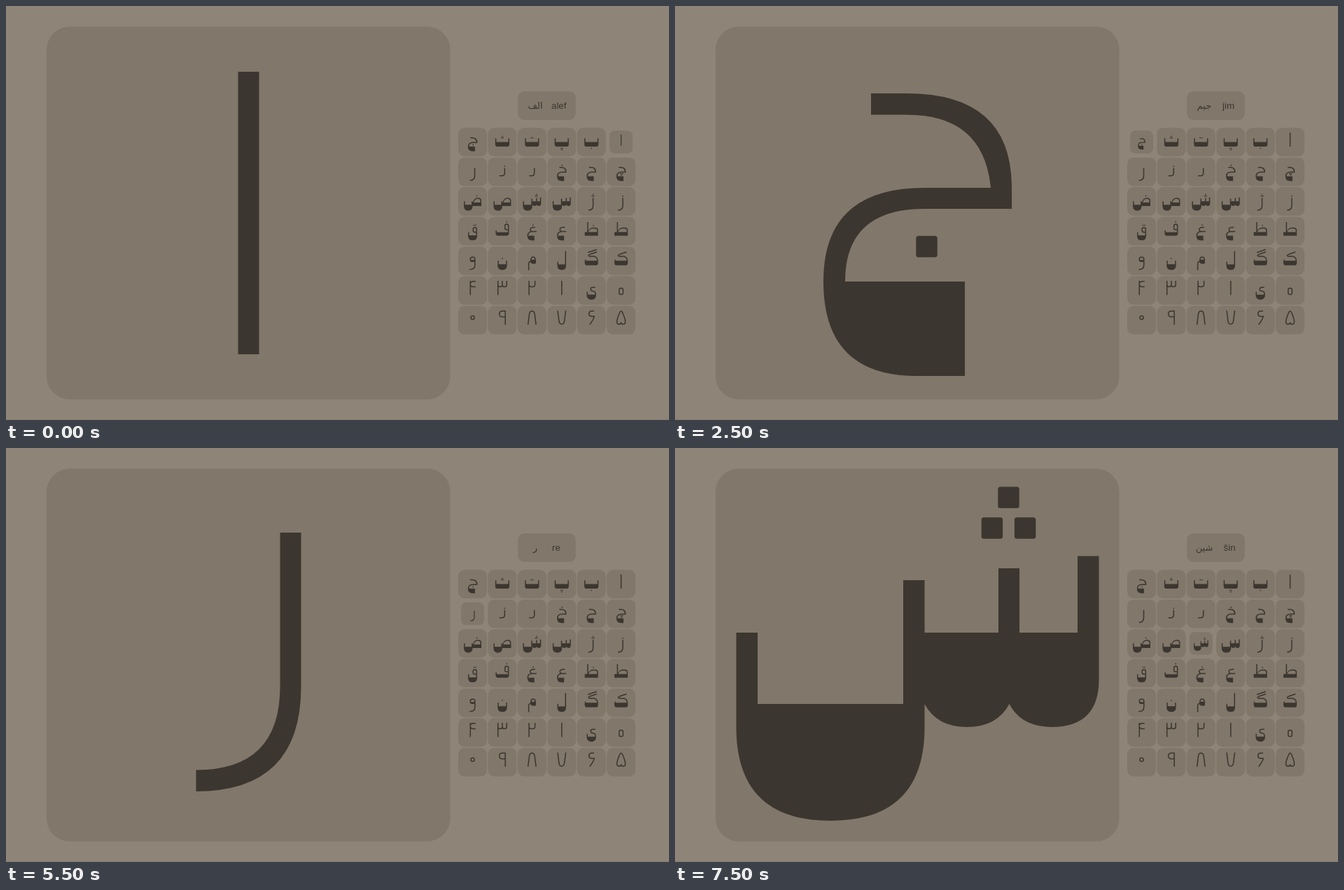
These frames come from a looping animation (947 by 592 pixels, 8000 ms). An HTML page:

```html
<!DOCTYPE html>
<html lang="fa">
<head>
<meta charset="utf-8">
<title>Persian letters</title>
<style>
html, body { margin: 0; width: 100%; height: 100%; overflow: hidden; background: #8e8478; }
svg { display: block; width: 947px; height: 592px; }
.tile { fill: #81776a; }
.ink { fill: #3c3630; }
.line { fill: none; stroke: #3c3630; stroke-width: 30; }
text { fill: #3c3630; font: 13.33px "Liberation Sans", Arial, sans-serif; }
#fa { font-family: "DejaVu Sans", sans-serif; font-size: 13px; text-anchor: middle; }
</style>
</head>
<body>
<svg viewBox="0 0 947 592">
  <rect class="tile" x="58" y="29.5" width="576.5" height="533" rx="33"/>
  <rect class="tile" x="731.3" y="122" width="82.4" height="41" rx="9"/>
  <text id="fa" x="756" y="147"></text>
  <text id="latin" y="147"></text>
  <g id="keys"></g>
  <g id="stage"></g>
  <rect x="0" y="591" width="947" height="1" fill="#857b6f"/>
</svg>
<script>
// Glyphs: x = 0 is the middle, y = 0 the baseline, 30 units the pen width.
const fill = d => `<path class="ink" fill-rule="evenodd" d="${d}"/>`;
const line = d => `<path class="line" d="${d}"/>`;
const dot = (x, y) => `<rect class="ink" x="${x - 15.2}" y="${y - 15.2}" width="30.4" height="30.4" rx="3.5"/>`;
const pair = (x, y) => dot(x - 23.6, y) + dot(x + 23.6, y);
const triUp = (x, y) => pair(x, y) + dot(x, y - 43.8);
const triDown = (x, y) => pair(x, y) + dot(x, y + 43.8);
const ring = (w, h, y, r) =>
  `<rect class="line" x="${-w / 2}" y="${y - h / 2}" width="${w}" height="${h}" rx="${r}"/>`;

const alef = fill("M-15-404H15V0H-15Z");
const be = fill("M-202-235h30.4v101H171.6V-235H202V-67Q202 0 135 0H-135Q-202 0-202-67Z");
const jim = fill("M-66.5-269H-15.5Q134.5-269 134.5-134V-104H10Q-103.5-104-103.5 0H67.5V135H-1.5" +
  "Q-134.5 135-134.5 0Q-134.5-134 9.5-134H104.5Q94.5-238.5-15.5-238.5H-66.5Z");
const dal = fill("M52-235H82V-95Q82 0-10 0H-82V-30H-10Q52-30 52-95Z");
const reAt = x => `<g transform="translate(${x})">` +
  fill("M45-235H75V-15Q75 135-75 135V104.5Q45 104.5 45-15Z") + "</g>";
const re = reAt(0), ze = reAt(-11.5);
const sin = fill("M-259-135h30.5v102h208v-177h30.5v75h105.5v-92h30v92h83V-244.5H259V-68" +
  "Q259 0 191.5 0Q148.5 0 131-33Q113.5 0 70.5 0Q27.5 0 10-33V0Q10 134-124.5 134Q-259 134-259 0Z");
const sad = fill("M-250-135h30v102h190v-102H0V-90Q40-235 150-235Q250-235 250-155V0H0Q0 134-125 134" +
  "Q-250 134-250 0ZM30-100Q60-205 150-205Q220-205 220-150V-100Z");
const ta = fill("M-190-105H-120V-390H-90V-140Q-40-235 60-235H100Q190-235 190-155V0H-190Z" +
  "M-85-105Q-50-205 60-205H90Q160-205 160-150V-105Z");
const eyn = line("M90-240H50Q-50-240-50-180Q-50-119 20-119H130M20-119Q-120-119-120 0") +
  fill("M-134 0H67V135H-1Q-134 135-134 0Z");
const fe = fill("M-190-150h30v50H160V-150h30V-68Q190 0 123 0H-123Q-190 0-190-68Z") +
  line("M175-150V-280Q175-330 125-330Q75-330 75-280V-215Q75-170 125-170H175") + dot(125, -400);
const qaf = fill("M-130-100h30v90H100V-100h30V0Q130 134 0 134Q-130 134-130 0Z") +
  line("M115-100V-185Q115-235 65-235Q15-235 15-185V-150Q15-100 65-100H115") + pair(65, -300);
const kaf = fill("M-190-160h30v30H190V-68Q190 0 123 0H-123Q-190 0-190-68Z") +
  line("M155-380L-50-310Q-120-280-50-255H80Q175-235 175-120");
const lam = fill("M-125-100h30v75H95V-404h30V0Q125 134 0 134Q-125 134-125 0Z");
const mim = line("M-95 140V-40Q-95-110-30-110H95V-150Q95-235 30-235Q-30-235-30-160V-110") +
  fill("M-45-160H110V-60Q110-40 60-40Q-45-40-45-110Z");
const nun = fill("M-134-135h30v102H104V-135h30V0Q134 134 0 134Q-134 134-134 0Z") + dot(0, -195);
const vav = line("M65-110H-10Q-65-110-65-165V-180Q-65-235 0-235Q65-235 65-180V0Q65 120-85 120") +
  fill("M-50-150H65V-95H-10Q-50-95-50-150Z");
const ye = line("M110-220H50Q-20-220-20-170Q-20-110 50-110Q119-110 119-5") +
  fill("M-134-90h30v80H134Q134 134 0 134Q-134 134-134 0Z");
const seven = line("M-115-404L-75-90Q-60-15 0-15Q60-15 75-90L115-404");

// Reading order, right to left.
const glyphs = [
  alef, be + dot(0, 49), be + triDown(0, 49), be + pair(0, -250), be + triUp(0, -250), jim + dot(13, -50),
  jim + triDown(13, -73), jim, jim + dot(13, -316), dal, dal + dot(67, -283.5), re,
  ze + dot(47.5, -284.5), ze + triUp(47.5, -284.5), sin, sin + triUp(130, -284.5), sad, sad + dot(120, -290),
  ta, ta + dot(60, -295), eyn, eyn + dot(30, -305), fe, qaf,
  kaf, kaf + line("M150-450L-100-365"), lam, mim, nun, vav,
  ring(110, 180, -105, 45), ye, alef,
  line("M-85 0V-404M-85-300Q-85-235-20-235H20Q85-235 85-300V-404"),
  line("M-125 0V-404M-125-290Q-125-235-62-235Q0-235 0-290V-404M0-290Q0-235 62-235Q125-235 125-290V-404"),
  line("M-65 0V-404M85-389H20Q-65-389-65-310Q-65-235 20-235H85"),
  line("M0-70Q0-15-60-15Q-120-15-120-80Q-120-160-60-300Q-25-390 0-390Q25-390 60-300Q120-160 120-80Q120-15 60-15Q0-15 0-70"),
  line("M75-390H10Q-70-390-70-315Q-70-240 10-240H80Q80-180-50 0"),
  seven, `<g transform="translate(0 -404) scale(1 -1)">${seven}</g>`,
  line("M85 0V-389H0Q-85-389-85-310Q-85-225 0-225H85"),
  ring(96, 96, -200, 35)
];

// Persian name, Latin name, Latin left edge, baseline on the stage.
const steps = [
  ["الف", "alef", 779, 498], ["ب", "be", 780, 427], ["پ", "pe", 780, 427], ["ت", "te", 781.5, 427],
  ["ث", "s\u0331e", 781, 427], ["جیم", "jim", 782, 394], ["چ", "če", 780, 394], ["ح", "he", 779.5, 394],
  ["خ", "xe", 780, 394], ["دال", "dāl", 780, 429], ["ذال", "zāl", 780.4, 429], ["ر", "re", 780, 356],
  ["ز", "ze", 779, 400], ["ژ", "že", 778.5, 400], ["سین", "sin", 783.5, 399], ["شین", "šin", 783.5, 399]
];

const STEP = 500;
const $ = id => document.getElementById(id);
const place = i => `translate(${878.6 - 42.42 * (i % 6)} ${194.6 + 42.43 * Math.floor(i / 6)})`;

$("keys").innerHTML = glyphs.map((g, i) =>
  `<g transform="${place(i)}"><rect class="tile" x="-20.5" y="-20.4" width="41" height="40.8" rx="9"/>` +
  `<g transform="translate(0 6.5) scale(.05)">${g}</g></g>`).join("");
const keys = [...$("keys").children];

let shown = -1;
function show(n) {
  if (n === shown) return;
  if (shown >= 0) keys[shown].setAttribute("transform", place(shown));
  keys[n].setAttribute("transform", place(n) + " scale(.8)");
  const [fa, latin, x, base] = steps[n];
  $("fa").textContent = fa;
  $("latin").textContent = latin;
  $("latin").setAttribute("x", x);
  $("stage").setAttribute("transform", `translate(346.5 ${base})`);
  $("stage").innerHTML = glyphs[n];
  shown = n;
}

const start = performance.now();
function tick() {
  show(Math.floor((performance.now() - start) / STEP) % steps.length);
  requestAnimationFrame(tick);
}
tick();
</script>
</body>
</html>
```
